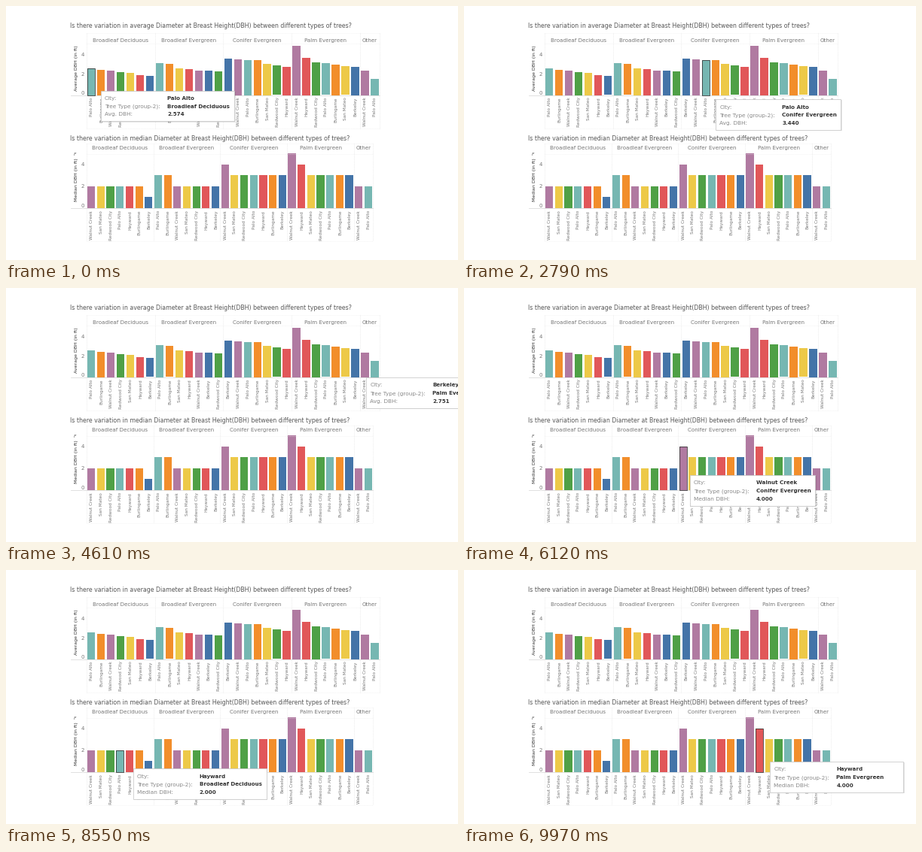
Recreate the animation shown at these times as a matplotlib script. Size 600 by 338 pixels, loop 10000 ms.

```python
import numpy as np
import matplotlib.pyplot as plt
from matplotlib.animation import FuncAnimation
from matplotlib.patches import Rectangle

W, H, DPI = 600, 338, 64
LOOP_MS, STEP_MS = 10000, 40
LAG_MS = 90          # the bar outline trails the tooltip
CURSOR_GAP = 9       # tooltip's left edge relative to the cursor

CITIES = {
    "P": ("Palo Alto", "#76b7b2"),
    "B": ("Burlingame", "#f28e2b"),
    "W": ("Walnut Creek", "#b07aa1"),
    "R": ("Redwood City", "#4fa046"),
    "S": ("San Mateo", "#edc948"),
    "H": ("Hayward", "#e15759"),
    "K": ("Berkeley", "#4474a8"),
}
GROUPS = ["Broadleaf Deciduous", "Broadleaf Evergreen", "Conifer Evergreen",
          "Palm Evergreen", "Other"]
STARTS = [0, 7, 14, 21, 28, 30]
TIP_WIDTHS = [177, 178, 166, 177, 166]


class Chart:
    """Geometry and data of one bar chart, in stage pixels."""

    def __init__(self, title, axis, measure, codes, values,
                 y0, base, unit, pitch, title_y, axis_y, bottom):
        self.title, self.axis, self.measure = title, axis, measure
        self.codes, self.values = codes, values
        self.y0, self.base, self.unit, self.pitch = y0, base, unit, pitch
        self.title_y, self.axis_y, self.bottom = title_y, axis_y, bottom

    def center(self, i):
        return 113.2 + i * self.pitch

    def index(self, x):
        return int(np.clip(round((x - 113.2) / self.pitch), 0, 29))

    def box(self, i):
        width, height = 0.8 * self.pitch, self.values[i] * self.unit
        return self.center(i) - width / 2, self.base - height, width, height


QUESTION = ("Is there variation in {} Diameter at Breast Height(DBH) "
            "between different types of trees?")
TOP = Chart(
    QUESTION.format("average"), "Average DBH (in ft)", "Avg. DBH:",
    "PBWRSHK" "PBSHWKR" "KWPBSRH" "WHRPBSK" "WP",
    [2.574, 2.45, 2.38, 2.22, 2.17, 1.92, 1.87,
     3.129, 3.08, 2.62, 2.55, 2.4, 2.36, 2.28,
     3.56, 3.47, 3.44, 3.407, 3.03, 2.94, 2.76,
     4.8, 3.62, 3.17, 3.12, 2.96, 2.86, 2.751, 2.4, 1.6],
    36, 118.5, 13.6, 12.97, 28.8, 83, 163)
BOTTOM = Chart(
    QUESTION.format("median"), "Median DBH (in ft)", "Median DBH:",
    "WSRPHBK" "PBWSRHK" "WSRPHBK" "WHSRPBK" "WP",
    [2] * 6 + [1] + [3] * 2 + [2] * 5 + [4] + [3] * 6
    + [5, 4] + [3] * 5 + [2] * 2,
    183, 269, 14.6, 12.68, 178.8, 231, 313)

# Tooltip path: time, left, top
TOP_PATH = np.array([(0, 126, 112.5), (1390, 218, 119.5), (2790, 337, 124.5),
                     (3090, 355, 123), (4470, 478.2, 119), (4610, 478.2, 119),
                     (5100, 498, 119)])
BOTTOM_PATH = np.array([(5700, 312, 240), (6000, 301, 248), (6120, 300, 249),
                        (6260, 300, 249), (7000, 230, 256), (7700, 125, 262),
                        (7900, 122, 266), (8200, 135, 266), (8550, 172, 264),
                        (9330, 343, 258), (9970, 407.5, 255)])
TOP_END, BOTTOM_START = 5160, 5700

fig = plt.figure(figsize=(W / DPI, H / DPI), dpi=DPI, facecolor="white")
ax = fig.add_axes([0, 0, 1, 1])


def reset_stage():
    ax.clear()
    ax.set(xlim=(0, W), ylim=(H, 0))
    ax.axis("off")


def label(x, y, text, px, color, **kw):
    return ax.text(x, y, text, size=px * 72 / DPI, color=color,
                   family="DejaVu Sans", va="baseline", **kw)


def line(xs, ys, color, style="-"):
    ax.plot(xs, ys, color=color, lw=0.8, ls=style)


def draw_chart(c):
    label(85, c.title_y, c.title, 7.93, "#5a5a5a")
    left = c.center(-0.5)
    right = c.center(29.5)
    for y in (c.y0, c.y0 + 14, c.bottom):
        line([left, right], [y, y], "#ececec", ":")
    for s in STARTS:
        x = c.center(s - 0.5)
        line([x, x], [c.y0, c.bottom], "#dedede", ":")
    line([86, right], [c.base, c.base], "#d6d6d6")

    for name, a, b in zip(GROUPS, STARTS, STARTS[1:]):
        mid = c.center((a + b - 1) / 2)
        label(mid, c.title_y + 19.3 if c is TOP else c.title_y + 12.2,
              name, 7.1, "#777777", ha="center")
    for v, dy in ((0, -1), (2, 2), (4, 2.5)):
        label(102, c.base - v * c.unit + dy, str(v), 7, "#777777", ha="center")
    label(94.5, c.axis_y, c.axis, 6.3, "#333333", ha="center",
          rotation=90, rotation_mode="anchor")

    for i, code in enumerate(c.codes):
        name, color = CITIES[code]
        x, y, w, h = c.box(i)
        ax.add_patch(Rectangle((x, y), w, h, fc=color, ec="none"))
        label(c.center(i) + 2, c.base + 2.8, name, 5.7, "#777777", ha="right",
              rotation=90, rotation_mode="anchor")


# The charts never change, so they are rendered once as a backdrop.
reset_stage()
draw_chart(TOP)
draw_chart(BOTTOM)
label(92, 199, "F", 6, "#555555", ha="center", style="italic")
fig.canvas.draw()
backdrop = np.array(fig.canvas.buffer_rgba())
reset_stage()
ax.imshow(backdrop, extent=(0, W, H, 0), aspect="auto",
          interpolation="nearest", zorder=0)

outline = ax.add_patch(Rectangle((0, 0), 1, 1, fill=False, ec="#333333",
                                 lw=0.9, zorder=2))
shadow = ax.add_patch(Rectangle((0, 0), 1, 41, fc="#000000", ec="none",
                                alpha=0.1, zorder=3))
panel = ax.add_patch(Rectangle((0, 0), 1, 41, fc="white", ec="#c8c8c8",
                               lw=0.9, zorder=4))
keys = [label(0, 0, s, 7.4, "#8a8a8a", zorder=5)
        for s in ("City:", "Tree Type (group-2):", "")]
vals = [label(0, 0, "", 7.1, "#333333", weight="bold", zorder=5)
        for _ in range(3)]
tip = [shadow, panel, *keys, *vals]


def at(path, t):
    return [np.interp(t, path[:, 0], path[:, k]) for k in (1, 2)]


def place_outline(chart, path, t):
    x = at(path, t - LAG_MS)[0] - CURSOR_GAP
    i = chart.index(x)
    bx, by, bw, bh = chart.box(i)
    outline.set_bounds(bx, by, bw, bh)
    outline.set_visible(bx <= x <= bx + bw)


def place_tip(chart, path, t):
    left, top = at(path, t)
    i = chart.index(left - CURSOR_GAP)
    group = min(i // 7, 4)
    width = TIP_WIDTHS[group]
    panel.set_bounds(left, top, width, 40.5)
    shadow.set_bounds(left + 1, top + 1, width + 0.5, 41)
    keys[2].set_text(chart.measure)
    texts = (CITIES[chart.codes[i]][0], GROUPS[group],
             f"{chart.values[i]:.3f}")
    for row, (key, val, text) in enumerate(zip(keys, vals, texts)):
        y = top + 12.4 + row * 10.7
        key.set_position((left + 5, y))
        val.set_position((left + 88, y))
        val.set_text(text)


def update(frame):
    t = frame * STEP_MS
    shown = t < TOP_END or t >= BOTTOM_START
    for artist in tip:
        artist.set_visible(shown)
    if shown:
        chart, path = (TOP, TOP_PATH) if t < TOP_END else (BOTTOM, BOTTOM_PATH)
        place_tip(chart, path, t)
        place_outline(chart, path, t)
    else:
        outline.set_visible(False)
    return [outline, *tip]


anim = FuncAnimation(fig, update, frames=LOOP_MS // STEP_MS, interval=STEP_MS,
                     repeat=True, repeat_delay=0, blit=False)
plt.show()
```
